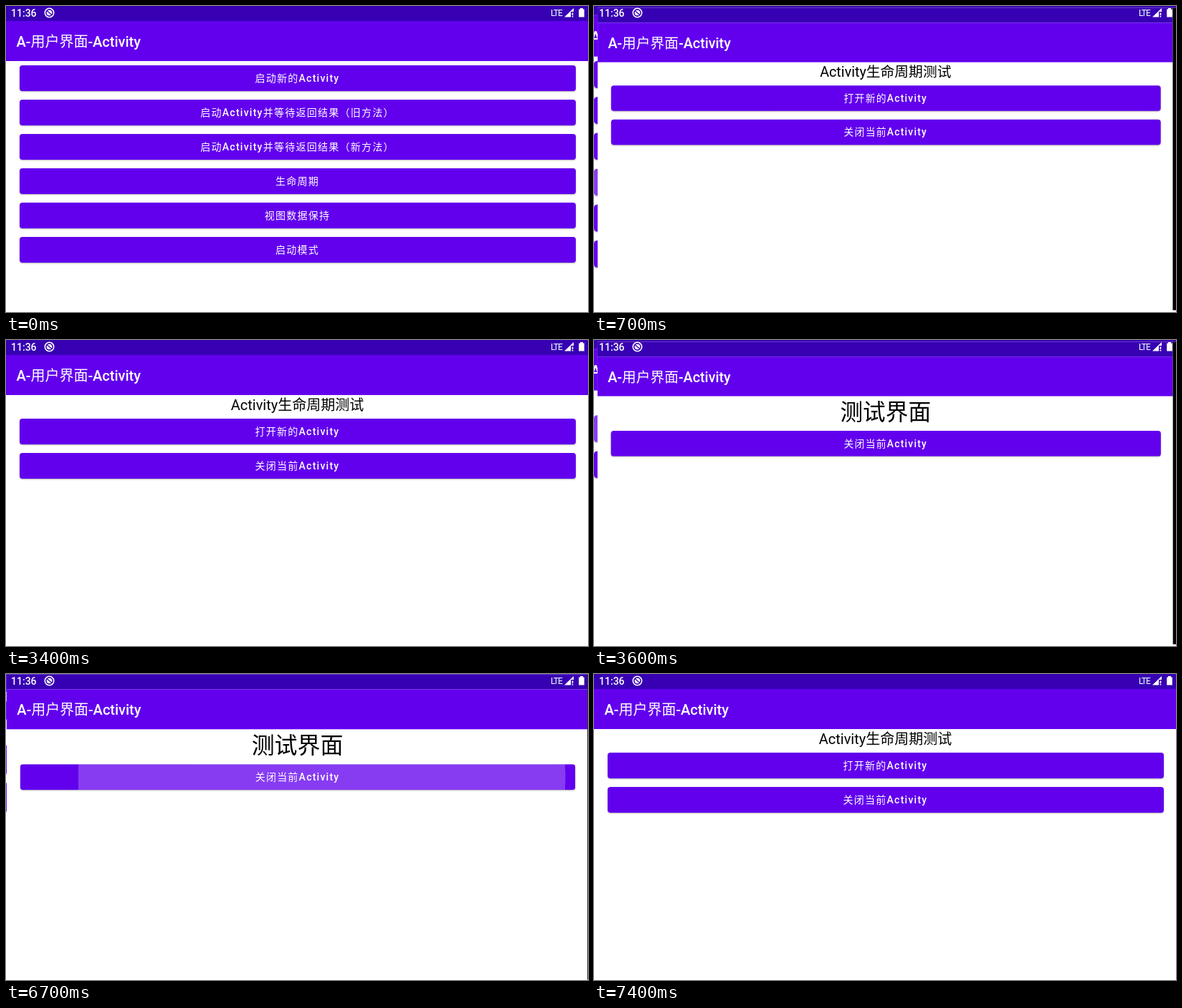
An HTML page that plays this animation: 812x428 px, repeating every 8 s.

```html
<!DOCTYPE html>
<html lang="zh-CN">
<head>
<meta charset="utf-8">
<style>
html, body { margin: 0; width: 100%; height: 100%; overflow: hidden; background: #fff; }
body { position: relative; font-family: Roboto, "Noto Sans CJK SC", "Noto Sans CJK", sans-serif; }
/* Each page includes the system bar area beyond the right edge. */
.page { position: absolute; left: 0; top: 0; width: 860px; height: 428px; background: #fff; transform-origin: 430px 214px; }
.page > * { position: absolute; box-sizing: border-box; white-space: nowrap; }
.top { left: 0; top: 0; width: 812px; height: 21px; background: #3700b3; }
.bar { left: 0; top: 21px; width: 812px; height: 56px; padding: 1px 0 0 14.5px; background: #6200ee; color: #fff; font: 500 20px/56px inherit; font-family: inherit; font-size: 20px; font-weight: 500; line-height: 56px; }
.nav { left: 812px; top: 0; width: 48px; height: 428px; background: #000; }
.label { left: 0; width: 813px; text-align: center; color: #000; }
.btn { left: 18.5px; width: 776px; height: 36px; border-radius: 4px; background-color: #6200ee; color: #fff; text-align: center; font-size: 14px; font-weight: 500; line-height: 36px; letter-spacing: 1.25px; box-shadow: 0 1px 2px rgba(0, 0, 0, .3); }
svg { position: absolute; left: 0; top: 0; z-index: 9; }
</style>
</head>
<body>
<svg width="812" height="22" fill="#fff">
  <text x="7" y="14.5" font-size="14" font-weight="500">11:36</text>
  <circle cx="60.5" cy="9.5" r="6.2" fill="none" stroke="#fff" stroke-width="1.6"/>
  <circle cx="60.5" cy="9.5" r="3.8"/>
  <path d="M57 6.5l7 6" stroke="#3700b3" stroke-width="1.4"/>
  <text x="760" y="13.5" font-size="12" letter-spacing="-1">LTE</text>
  <path d="M779 15.5L792 3v5h-4v7.5zM789.5 9.5h1.8v3.2h-1.8zM789.5 13.8h1.8v1.7h-1.8z"/>
  <path d="M801 3h4v1.4h1.8v11.2h-7.6V4.4h1.8z"/>
</svg>
<script>
const LOOP = 8000, STEP = 100, DURATION = 400;

function add(parent, cls, text = '', style = {}) {
  const el = document.createElement('div');
  el.className = cls;
  el.textContent = text;
  Object.assign(el.style, style);
  parent.append(el);
  return el;
}

function makePage(label, size, labelTop, firstTop, names) {
  const el = add(document.body, 'page');
  add(el, 'top');
  add(el, 'bar', 'A-用户界面-Activity');
  add(el, 'nav');
  if (label) add(el, 'label', label, { top: labelTop + 'px', fontSize: size + 'px', lineHeight: size * 1.35 + 'px' });
  const buttons = names.map((name, i) => add(el, 'btn', name, { top: firstTop + 48 * i + 'px' }));
  return { el, buttons };
}

const pages = [
  makePage('', 0, 0, 83, ['启动新的Activity', '启动Activity并等待返回结果（旧方法）',
    '启动Activity并等待返回结果（新方法）', '生命周期', '视图数据保持', '启动模式']),
  makePage('Activity生命周期测试', 20, 78, 110, ['打开新的Activity', '关闭当前Activity']),
  makePage('测试界面', 32, 79, 126, ['关闭当前Activity'])
];

const moves = [
  { start: 533, from: 0, to: 1, open: true },
  { start: 3430, from: 1, to: 2, open: true },
  { start: 6680, from: 2, to: 1, open: false }
];

const taps = [
  { start: 500, button: pages[0].buttons[3], x: 480 },
  { start: 3400, button: pages[1].buttons[0], x: 660 },
  { start: 6644, button: pages[2].buttons[0], x: 660 }
];

const clamp = v => Math.max(0, Math.min(1, v));
const cubic = (a, b, c, d, u) =>
  a * (1 - u) ** 3 + 3 * b * u * (1 - u) ** 2 + 3 * c * u * u * (1 - u) + d * u ** 3;

// Fast out, extra slow in: two joined Bézier curves.
function ease(x) {
  const [px, py] = x < 1 / 6
    ? [[0, .05, .133333, 1 / 6], [0, 0, .06, .4]]
    : [[1 / 6, .208333, .25, 1], [.4, .82, 1, 1]];
  let lo = 0, hi = 1;
  for (let i = 0; i < 30; i++) {
    const mid = (lo + hi) / 2;
    if (cubic(...px, mid) < x) lo = mid; else hi = mid;
  }
  return cubic(...py, lo);
}

function show(index, scale, alpha, z) {
  const s = pages[index].el.style;
  s.visibility = 'visible';
  s.transform = scale === 1 ? 'none' : `scale(${scale})`;
  s.opacity = alpha;
  s.zIndex = z;
}

function drawTap({ start, button, x }, time) {
  const age = time - start;
  if (age <= 0 || age > 350) {
    button.style.backgroundImage = 'none';
    return;
  }
  const grow = 1 - 400 ** (-1.4 * Math.min(1, age / 225));
  const r = 388.4 * grow, cx = x + (388 - x) * grow;
  button.style.backgroundImage =
    `radial-gradient(circle at ${cx}px 18px, rgba(255,255,255,.235) ${r}px, transparent ${r + .5}px)`;
}

function draw(now) {
  const time = Math.floor(now % LOOP / STEP) * STEP;
  for (const page of pages) page.el.style.visibility = 'hidden';
  const move = moves.filter(m => m.start <= time).pop();
  if (!move) {
    show(0, 1, 1, 1);
  } else {
    const age = time - move.start;
    const p = ease(clamp(age / DURATION)), fade = clamp((age - 50) / 50);
    if (age >= DURATION) {
      show(move.to, 1, 1, 1);
    } else if (move.open) {
      show(move.from, 1 + .05 * p, 1, 1);
      show(move.to, .85 + .15 * p, fade, 2);
    } else {
      show(move.to, 1.1 - .1 * p, 1, 1);
      show(move.from, 1 - .1 * p, 1 - fade, 2);
    }
  }
  for (const tap of taps) drawTap(tap, time);
}

const origin = performance.now();
function tick() {
  draw(performance.now() - origin);
  requestAnimationFrame(tick);
}
tick();
</script>
</body>
</html>
```
